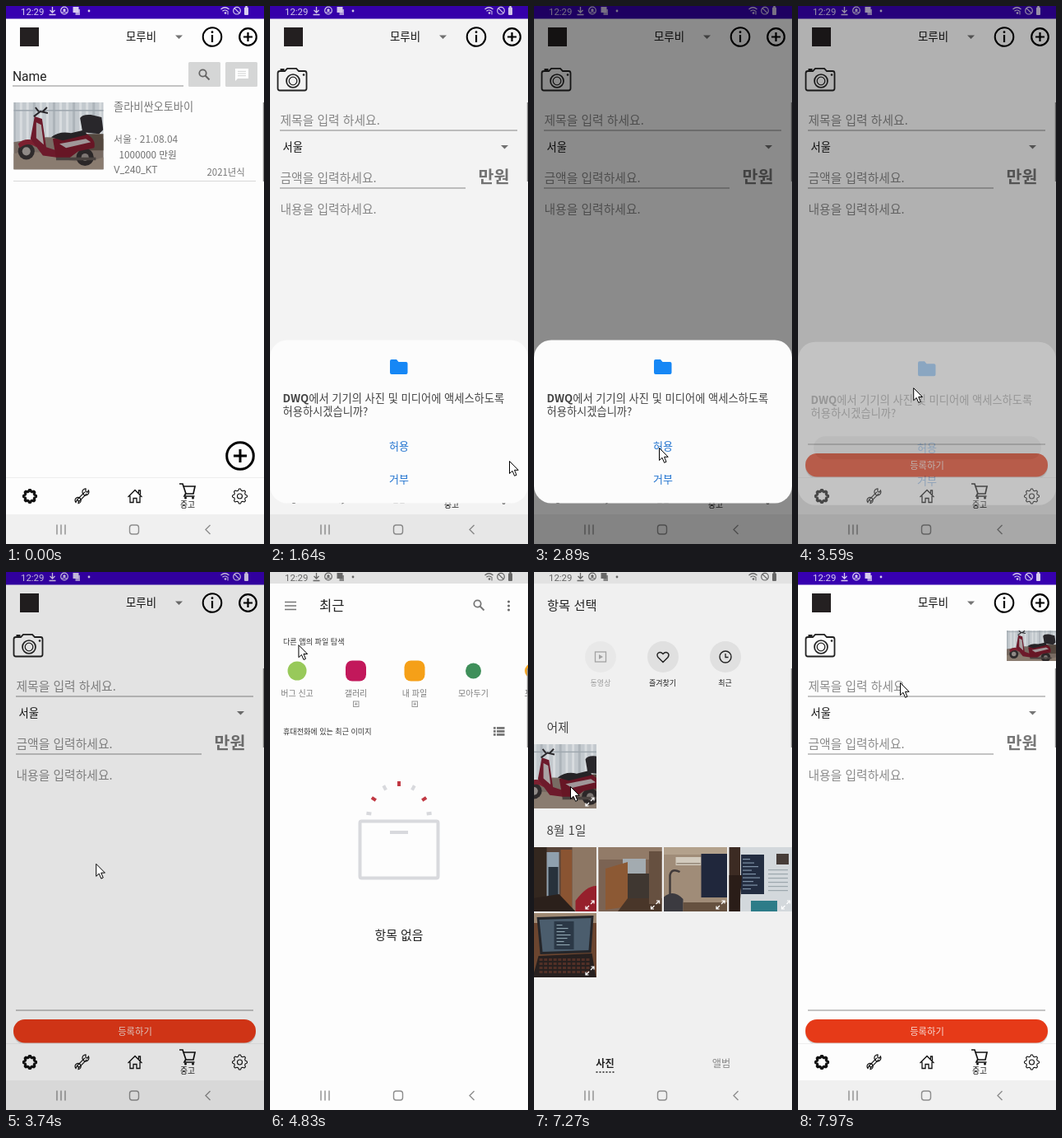
These frames come from a looping animation (314 px wide and 653 px high, 8 s). An HTML page:

```html
<!DOCTYPE html>
<html lang="ko">
<head>
<meta charset="utf-8">
<title>Used bike listing</title>
<style>
html, body { margin: 0; width: 100%; height: 100%; overflow: hidden; background: #fdfdfd; }
svg { display: block; }
#stage { width: 100vw; height: 100vh; }
text { font-family: Roboto, "Noto Sans CJK KR", "Noto Sans CJK", sans-serif; white-space: pre; }
.ko { font-family: "Noto Sans CJK KR", "Noto Sans CJK", sans-serif; }
</style>
</head>
<body>
<svg id="stage" viewBox="0 0 314 653" preserveAspectRatio="none"></svg>
<script>
const LOOP = 8000, STEP = 78.13, LEAD = 18;
const stage = document.getElementById('stage');

// Markup helpers
const rect = (x, y, w, h, fill, more = '') => `<rect x="${x}" y="${y}" width="${w}" height="${h}" fill="${fill}" ${more}/>`;
const circle = (x, y, r, fill, more = '') => `<circle cx="${x}" cy="${y}" r="${r}" fill="${fill}" ${more}/>`;
const line = (d, color, w = 1, more = '') => `<path d="${d}" fill="none" stroke="${color}" stroke-width="${w}" ${more}/>`;
const fill = (d, color, more = '') => `<path d="${d}" fill="${color}" ${more}/>`;
const text = (s, x, y, size, color, weight = 400, more = '') =>
  `<text x="${x}" y="${y}" font-size="${size}" fill="${color}" font-weight="${weight}" ${more}>${s}</text>`;
const ko = (s, x, y, size, color, weight = 400, more = '') => text(s, x, y, size, color, weight, 'class="ko" ' + more);
const mid = (s, x, y, size, color, weight = 400) => ko(s, x, y, size, color, weight, 'text-anchor="middle"');
const group = (id, body) => `<g id="${id}">${body}</g>`;
const range = (n, f) => Array.from({ length: n }, (_, i) => f(i)).join('');

function plus(x, y, r, arm, w) {
  return circle(x, y, r, 'none', `stroke="#000" stroke-width="${w}"`) +
    line(`M${x - arm} ${y}h${2 * arm}M${x} ${y - arm}v${2 * arm}`, '#000', w);
}

function cog(x, y, r, teeth, w) {
  let d = '';
  for (let i = 0; i < teeth * 4; i++) {
    const a = (i - 0.5) / (teeth * 4) * 2 * Math.PI;
    const q = i % 4 < 2 ? r : r * 0.78;
    d += (i ? 'L' : 'M') + (x + q * Math.cos(a)).toFixed(2) + ' ' + (y + q * Math.sin(a)).toFixed(2);
  }
  return line(d + 'Z', '#111', w, 'stroke-linejoin="round"');
}

const caret = (x, y) => fill(`M${x - 4.5} ${y - 2}h9l-4.5 4.5z`, '#757575');
const lens = (x, y, c) => circle(x, y, 4.2, 'none', `stroke="${c}" stroke-width="1.8"`) +
  line(`M${x + 3} ${y + 3}l5 5`, c, 2);

// Photo scenes
const symbol = (id, w, h, body) =>
  `<symbol id="${id}" viewBox="0 0 ${w} ${h}" preserveAspectRatio="xMidYMid slice">${body}</symbol>`;
const photo = (id, x, y, w, h) => `<use href="#${id}" x="${x}" y="${y}" width="${w}" height="${h}"/>`;

const scenes =
  symbol('scooter', 110, 81,
    rect(0, 0, 110, 81, '#c3c9ce') +
    range(14, i => rect(i * 8, 0, 3, 50, i % 3 ? '#d8dcdf' : '#adb4ba')) +
    rect(0, 9, 110, 1.5, '#9ea7ae') +
    fill('M0 48L40 42L110 44V81H0Z', '#786b63') +
    fill('M0 62Q30 56 55 66T110 66V81H0Z', '#8a7c70') +
    fill('M84 38h26v20h-26z', '#54483f') +
    circle(16, 59, 10, '#2f2b2c') + circle(16, 59, 5, '#8f8986') +
    circle(87, 66, 10.5, '#2b2728') + circle(87, 66, 4.5, '#7d7673') +
    fill('M6 50Q16 40 31 49L28 54Q18 47 8 55Z', '#7c2030') +
    fill('M26 17L35 20L40 54L58 60V67L36 64L21 44Z', '#6d1a2b') +
    fill('M28 24l6 3l3 24l-9-8z', '#aaa3a4') +
    fill('M48 44L87 37Q101 44 98 55L79 59L68 67H52Z', '#671625') +
    fill('M56 50l32-6l6 4l-30 7z', '#a09799') +
    fill('M46 42Q56 34 70 37L87 33L89 39L60 46Z', '#252326') +
    fill('M81 19Q84 14 94 15L107 18L109 33L104 38L84 36Z', '#29272b') +
    line('M25 17L33 11L42 13M31 11L27 6M36 11L41 6', '#29272b', 2) +
    line('M52 68L100 68', '#4a4340', 3.5)) +
  symbol('door', 78, 78,
    rect(0, 0, 78, 78, '#59453a') + rect(0, 0, 17, 78, '#33271f') + rect(17, 6, 15, 56, '#8fa0ae') +
    rect(19, 24, 12, 38, '#28323c') + rect(34, 3, 14, 70, '#8a5432') + rect(48, 0, 30, 78, '#8d7764') +
    fill('M0 62L32 57L52 78H0Z', '#2b201b') + fill('M52 65Q66 46 78 47V78H52Z', '#96202c')) +
  symbol('blur', 78, 78,
    rect(0, 0, 78, 78, '#7b6353') + rect(0, 0, 78, 15, '#927b68') + rect(30, 14, 28, 30, '#a3abb0') +
    rect(31, 32, 34, 32, '#3f3731') + fill('M9 26L36 18V72L9 76Z', '#8c5934') +
    fill('M36 62H78V78H24Z', '#493629') + rect(62, 5, 16, 64, '#665040')) +
  symbol('room', 78, 78,
    rect(0, 0, 78, 78, '#a08c78') + rect(0, 0, 78, 9, '#b3a18c') + rect(15, 12, 31, 10, '#d2cabd') +
    rect(16, 19, 29, 1.5, '#958879') + rect(46, 8, 32, 53, '#20273c') +
    line('M8 76V34Q10 25 20 30', '#413a3a', 2.5) + fill('M0 61Q12 50 24 63V78H0Z', '#3b3a40') +
    rect(24, 67, 54, 11, '#665140')) +
  symbol('monitor', 78, 78,
    rect(0, 0, 78, 78, '#d3d8dc') + rect(0, 0, 14, 78, '#3c2b23') + rect(15, 9, 28, 48, '#232d41') +
    range(9, i => rect(17, 14 + i * 4.5, 9 + i * 5 % 13, 1.2, '#7e91a6')) +
    rect(58, 8, 15, 13, '#463c38') + range(6, i => rect(48, 27 + i * 5, 24, 1.2, '#9ca7ad')) +
    rect(27, 65, 32, 13, '#2d7c88') + fill('M0 34h16l-3 44H0z', '#2a1d18')) +
  symbol('laptop', 78, 78,
    rect(0, 0, 78, 78, '#6b452f') + rect(0, 0, 78, 12, '#a08a74') + fill('M5 5L74 3L71 48L9 50Z', '#25262a') +
    fill('M8 8L71 6L68 45L12 47Z', '#4b5d6d') + rect(26, 10, 24, 34, '#2b3846') +
    range(7, i => rect(29, 14 + i * 4, 7 + i * 7 % 11, 1.1, '#8fa6b1')) +
    fill('M7 52L72 49L77 78H0Z', '#27201f') +
    range(4, r => range(11, i => rect(8 + i * 5.7, 55 + r * 5, 4, 3, '#523027'))));

// Shared chrome
const header =
  rect(17, 26, 23, 23, '#242021') +
  mid('모루비', 164.5, 42, 13.4, '#111', 500) + caret(210.5, 37.5) +
  circle(251, 37.5, 11.3, 'none', 'stroke="#000" stroke-width="2"') +
  circle(251, 31.7, 1.4, '#000') + line('M251 35v9', '#000', 2.2) +
  plus(294.5, 37.5, 10.3, 5.5, 2.2);

const tabs =
  rect(0, 572, 314, 45, '#fdfdfd') + line('M0 572.5H314', '#eee') +
  cog(29, 595, 7.6, 8, 3) +
  line('M87.5 600.5L97 591', '#111', 4.2) + line('M87.5 600.5L97 591', '#fdfdfd', 1.8) +
  line('M100.5 588a4 4 0 1 1-3.5-2.2v3.4l2 1zM85 602.5a3.6 3.6 0 1 1 3 1.1l.4-3-2-1z', '#111', 1.2) +
  line('M148.5 596L157 587.5L165.5 596M151 594.5V602.5H155V597.5H159V602.5H163V594.5M161.5 591V588H163.5V593', '#111', 1.3) +
  line('M211 580h4l4 12h9l2-9h-14M218.5 592l-1.5 3h12.5', '#111', 1.7) +
  circle(218.5, 597, 1.5, '#111') + circle(227.5, 597, 1.5, '#111') +
  mid('중고', 221, 609, 9.8, '#111', 500) +
  cog(284.5, 595, 9, 8, 1.1) + circle(284.5, 595, 3, 'none', 'stroke="#111" stroke-width="1.1"');

const statusIcons = c =>
  text('12:29', 18, 10.5, 11.4, c) +
  line('M56.5 1v7m-3-3l3 3l3-3M52.5 10.5h8', c, 1.3) +
  circle(71, 5.5, 4.3, 'none', `stroke="${c}" stroke-width="1.2"`) + circle(71, 5, 1.7, c) + line('M68 8q3-2 6 0', c) +
  rect(81.5, 1, 7, 7, c) + rect(84.5, 4, 5.5, 7, c, 'opacity=".75"') + circle(101, 6, 1.4, c) +
  line('M261.5 4q5-4.5 10 0M263.5 6.3q3-2.6 6 0', c, 1.2) + circle(267, 8.5, 1.3, c) + line('M270 6v4.5', c) +
  circle(281, 5.7, 4.3, 'none', `stroke="${c}" stroke-width="1.2"`) + line('M278 2.7l6 6', c, 1.2) +
  rect(290, 1.5, 5, 9.5, c, 'rx="1"') + rect(291.3, 0, 2.4, 2, c);

const navIcons =
  line('M62 629.5v12M67 629.5v12M72 629.5v12', '#8d8d8d', 1.4) +
  rect(150.5, 630, 11, 11, 'none', 'rx="3" stroke="#8d8d8d" stroke-width="1.4"') +
  line('M248.5 630l-5.5 5.5l5.5 5.5', '#8d8d8d', 1.4);

// Pages
const home =
  rect(0, 15, 314, 602, '#fdfdfd') + header +
  text('Name', 8, 91, 15.6, '#222') + line('M8 97H216', '#8b8b8b') +
  rect(222, 68, 39, 30, '#d5d6d6', 'rx="1.5"') + lens(239.5, 81.5, '#646464') +
  rect(267, 68, 39, 30, '#d5d6d6', 'rx="1.5"') +
  fill('M279 76h16v12h-13l-3 3z', '#fff') + line('M282 79.3h10M282 82h10M282 84.7h10', '#d0d1d1') +
  photo('scooter', 9.5, 117, 109, 81.5) +
  ko('졸라비싼오토바이', 131, 127, 13.2, '#777', 500) +
  ko('서울 · 21.08.04', 131, 166, 11.9, '#777') +
  ko('1000000 만원', 137.5, 184.5, 11.7, '#6b6b6b', 500) +
  text('V_240_KT', 131, 203, 12, '#777') + ko('2021년식', 244.5, 206, 11.4, '#777') +
  line('M9 212.5H304', '#d8d8d8') +
  plus(285, 546, 16.3, 8, 3);

const form =
  rect(0, 15, 314, 602, '#fdfdfd') + header +
  line('M12 79h6l3-3.2h11l3 3.2h7q2.5 0 2.5 2.5v18.5q0 2.5-2.5 2.5h-30q-2.5 0-2.5-2.5v-18.5q0-2.5 2.5-2.5z', '#222', 1.8) +
  line('M12.5 77h5', '#222', 2) + circle(28, 91, 8, 'none', 'stroke="#222" stroke-width="1.7"') +
  circle(28, 91, 4.8, 'none', 'stroke="#222" stroke-width="1.3"') + circle(41, 83.5, 1.3, '#222') +
  ko('제목을 입력 하세요.', 12.5, 144, 14.8, '#8b8b8b') + line('M12 151H301', '#8b8b8b') +
  ko('서울', 15.5, 176, 13.2, '#111', 500) + caret(285.5, 171) +
  ko('금액을 입력하세요.', 12.5, 214, 14.8, '#8b8b8b') + line('M12 221H238', '#8b8b8b') +
  ko('만원', 253.5, 214.5, 20.6, '#777', 700) +
  ko('내용을 입력하세요.', 12.5, 251.5, 14.8, '#8b8b8b') + line('M12 532H301', '#8b8b8b') +
  rect(9, 545, 295, 28.5, '#bbb', 'rx="14" opacity=".6"') + rect(9, 543, 295, 28.5, '#e63a18', 'rx="14"') +
  mid('등록하기', 157, 561.5, 11.3, '#f6d9d2') +
  group('thumb', photo('scooter', 254, 71, 60, 37));

const gauge = [172, 146, 118, 90, 62, 34, 8].map((deg, i) => {
  const a = deg * Math.PI / 180;
  const x = 157 + 37 * Math.cos(a), y = 299 - 42 * Math.sin(a);
  return rect(-3, -2, 6, 4, i % 2 ? '#c13943' : '#d8d9dd', `transform="translate(${x} ${y}) rotate(${-deg})"`);
}).join('');

const appMark = (x, shape, label, inner) => shape + mid(label, x, 150.5, 10, '#7b7b7b') +
  (inner ? rect(x - 3, 157, 6.5, 6.5, 'none', 'stroke="#999"') + line(`M${x - 1.5} 160.2h3.5M${x + .25} 158.5v3.5`, '#999') : '');

const picker =
  rect(0, 14, 314, 639, '#fdfdfd') +
  line('M18 36.5h14M18 41h14M18 45.5h14', '#777', 1.6) +
  ko('최근', 60, 47, 16.6, '#222', 500) + lens(252.5, 38.5, '#777') +
  range(3, i => circle(290.5, 36 + i * 5, 1.5, '#666')) +
  ko('다른 앱의 파일 탐색', 16, 87.5, 9.1, '#333', 500) +
  appMark(33, circle(33, 120, 11.5, '#98c95a'), '버그 신고') +
  appMark(104.5, rect(92, 107.5, 25, 25, '#c2185b', 'rx="8"'), '갤러리', true) +
  appMark(176, rect(163.5, 107.5, 25, 25, '#f5a018', 'rx="8"'), '내 파일', true) +
  appMark(247.5, circle(247.5, 120, 9.5, '#3f8f5a'), '모아두기') +
  circle(319, 120, 9, '#f5a623') + ko('포토', 309.5, 150.5, 10, '#7b7b7b') +
  ko('휴대전화에 있는 최근 이미지', 16, 196.5, 9.05, '#333', 500) +
  range(3, i => rect(272, 188 + i * 4, 2.7, 2.8, '#777') + rect(276, 188 + i * 4, 9.5, 2.8, '#777')) +
  gauge + rect(109.5, 302.5, 95, 69, 'none', 'rx="2" stroke="#d8d9dd" stroke-width="4"') +
  line('M146 316H168', '#d8d9dd', 4) + mid('항목 없음', 157, 446, 14.9, '#222') +
  group('shade', rect(0, 14, 314, 639, '#000'));

const expand = (x, y) => line(`M${x + 1} ${y - 1}l4-4m-3.5 0h3.5v3.5M${x - 1} ${y + 1}l-4 4m0-3.5v3.5h3.5`, '#fff', 1.2);
const cell = (id, x, y) => photo(id, x, y, 77, 78) + expand(x + 69, y + 70);

// Gallery content is laid out as if the sheet's top edge were at y = 0.
const sheet =
  rect(0, 0, 314, 674, '#f0f0f0') +
  ko('항목 선택', 16, 46, 15.3, '#222', 500) +
  `<g opacity=".4">${circle(81, 103, 19, '#dedede')}${rect(74.5, 97, 13, 12, 'none', 'stroke="#333" stroke-width="1.3"')}${fill('M79 100v6l5-3z', '#333')}${mid('동영상', 81, 138, 9, '#222', 500)}</g>` +
  circle(157, 103, 19, '#e0e0e0') +
  line('M157 109.5l-6-6q-2-3 0-5q3-2.5 6 1q3-3.5 6-1q2 2 0 5z', '#222', 1.4) +
  mid('즐겨찾기', 156.5, 138, 9, '#222', 500) +
  circle(233, 103, 19, '#e0e0e0') + circle(233, 103, 7, 'none', 'stroke="#222" stroke-width="1.4"') +
  line('M233 99v4.5h3.5', '#222', 1.3) + mid('최근', 232.5, 138, 9, '#222', 500) +
  ko('어제', 15.5, 194, 14.8, '#444') + cell('scooter', -1, 209) +
  ko('8월 1일', 15.5, 319, 14.8, '#444') +
  ['door', 'blur', 'room', 'monitor'].map((id, i) => cell(id, i * 79.5 - 1, 334)).join('') +
  cell('laptop', -1, 414) +
  mid('사진', 86.5, 601, 12.2, '#222', 700) + line('M75.5 607h22', '#222', 1.5, 'stroke-dasharray="2 2"') +
  mid('앨범', 228, 601, 12.2, '#888');

const dialog =
  rect(0, 405.5, 314, 198, '#fcfcfc', 'rx="21"') +
  group('ripple', rect(19, 520, 277, 28, '#000', 'rx="14" opacity=".12"')) +
  fill('M146 431q0-2 2-2h6l2.5 3h9q2 0 2 2v11q0 2-2 2h-17.5q-2 0-2-2z', '#1687f5') +
  ko('<tspan font-weight="700">DWQ</tspan>에서 기기의 사진 및 미디어에 액세스하도록', 15.5, 481, 13.25, '#444') +
  ko('허용하시겠습니까?', 15.5, 497, 13.25, '#444') +
  mid('허용', 157, 538.5, 13, '#2173cf', 500) + mid('거부', 157, 579, 13, '#2173cf', 500);

const arrow = fill('M.5 .5V15.5L4 12.3L6.6 18.3L9 17.2L6.5 11.3H11.2Z', '#fff', 'stroke="#000" stroke-width="1"');

stage.innerHTML = `<defs>${scenes}</defs>` +
  group('home', home) + group('form', form) + group('tabs', tabs) + group('picker', picker) +
  rect(0, 617, 314, 36, '#f0f0f0', 'id="navBack"') + group('sheet', sheet) +
  group('darkBar', rect(0, 0, 314, 15.5, '#3700b0') + statusIcons('#d9cdf0')) +
  group('lightBar', rect(0, 0, 314, 14, '#e2e2e2') + statusIcons('#666')) +
  navIcons + rect(312.8, 117, 1.2, 96, '#8e8e8e') +
  rect(0, 0, 314, 653, '#000', 'id="dim"') + group('dialog', dialog) + group('cursor', arrow);

const part = Object.fromEntries([...stage.querySelectorAll('[id]')].map(e => [e.id, e]));

// Pointer route: time, x, y
const route = [
  [240, 290, 624], [620, 285, 540], [1050, 285, 540], [1100, 288, 543], [1200, 288, 543], [1250, 291, 545],
  [1590, 291, 545], [1640, 291, 552], [2060, 291, 552], [2740, 152, 536], [3130, 152, 536], [3590, 141, 466],
  [4130, 34, 88], [4840, 34, 88], [5530, 105, 116], [6330, 105, 116], [7030, 44, 260], [7300, 44, 260], [7960, 124, 134]
];

const ramp = (t, a, b) => Math.min(1, Math.max(0, (t - a) / (b - a)));
const show = (name, on) => part[name].setAttribute('visibility', on ? 'visible' : 'hidden');
const fade = (name, v) => part[name].setAttribute('opacity', v.toFixed(3));
const move = (name, x, y) => part[name].setAttribute('transform', `translate(${x.toFixed(2)} ${y.toFixed(2)})`);

function pointerAt(t) {
  const i = route.findIndex(p => p[0] > t);
  if (i < 0) return route[route.length - 1].slice(1);
  const a = route[Math.max(0, i - 1)], b = route[i];
  const u = ramp(t, a[0], b[0]);
  return [a[1] + (b[1] - a[1]) * u, a[2] + (b[2] - a[2]) * u];
}

function draw(ms) {
  const t = Math.floor((ms % LOOP + LEAD) / STEP) * STEP;
  const atHome = t < 1635;
  const inPicker = t > 4825 && t < 6600;
  const inSheet = t > 6315 && t < 7450;
  const picking = t > 4825 && t < 7300;

  show('home', atHome);
  show('form', !atHome && !inPicker);
  show('thumb', t > 7000 && t < LOOP);
  part.thumb.setAttribute('display', t > 7000 ? 'inline' : 'none');
  show('tabs', !inPicker);
  show('picker', inPicker);
  show('sheet', inSheet);
  show('darkBar', !picking);
  show('lightBar', picking);
  part.navBack.setAttribute('fill', inPicker ? '#fdfdfd' : '#f0f0f0');

  const rise = 1 - ramp(t, 6328, 6570);
  const leave = ramp(t, 7270, 7450);
  move('picker', 0, -16 * ramp(t, 6250, 6328));
  fade('shade', 0.1 * ramp(t, 6250, 6328));
  move('sheet', 0, 21 * rise * rise + 60 * leave * leave);
  fade('sheet', 1 - leave);

  const closing = ramp(t, 3450, 3640);
  fade('dim', 0.45 * ramp(t, 1612, 1953) * (1 - ramp(t, 3480, 3828)));
  show('dialog', !atHome && t < 3640);
  fade('dialog', 1 - closing);
  move('dialog', 0, 3 * closing);
  fade('ripple', ramp(t, 3100, 3400));

  show('cursor', t > 230);
  move('cursor', ...pointerAt(t));
}

const start = performance.now();
function tick() {
  draw(performance.now() - start);
  requestAnimationFrame(tick);
}
tick();
</script>
</body>
</html>
```
